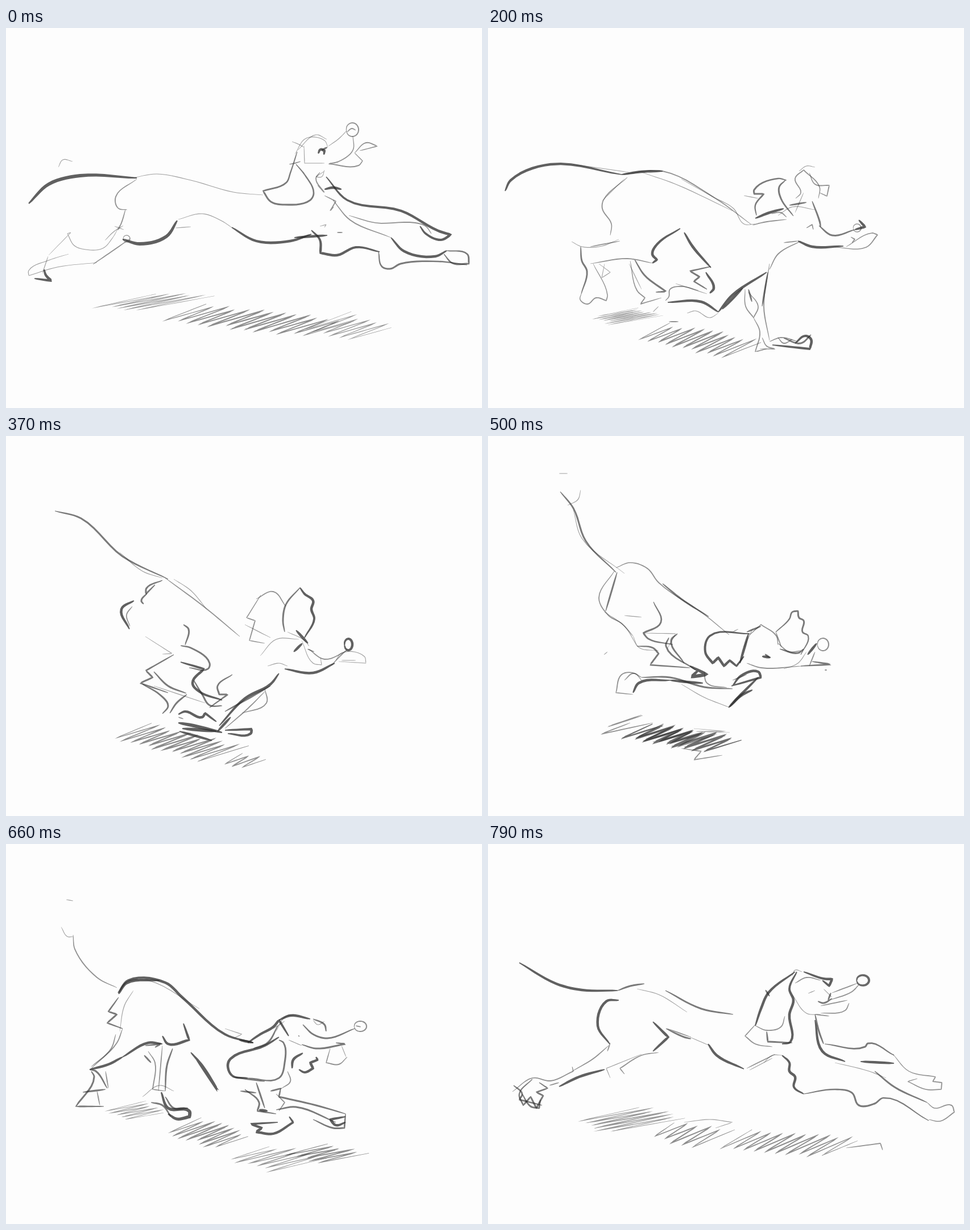
These frames come from a looping animation (837x669 px, 830 ms). An HTML page:

```html
<!DOCTYPE html>
<html lang="en">
<head>
<meta charset="utf-8">
<title>Running dog sketch</title>
<style>
html, body { margin: 0; width: 100%; height: 100%; overflow: hidden; background: #fdfdfd; }
svg { display: block; width: 100vw; height: 100vh; }
</style>
</head>
<body>
<svg id="stage" viewBox="0 0 837 669" fill="#2a2a2a"></svg>
<script>
const LOOP = 830, STEPS = 7;
const lerp = (a, b, k) => a + (b - a) * k;
const mix = (p, q, k) => p.map((v, i) => lerp(v, q[i], k));
const sub = (p, q) => [p[0] - q[0], p[1] - q[1]];
const unit = v => { const l = Math.hypot(...v) || 1; return [v[0] / l, v[1] / l]; };

let seed = 7;
const random = () => (seed = seed * 16807 % 2147483647) / 2147483647;

// Smooth curve through the points; sharp turns stay corners.
function curve(pts) {
  const heading = (i, own) => {
    if (!i || i === pts.length - 1) return own;
    const a = unit(sub(pts[i], pts[i - 1])), b = unit(sub(pts[i + 1], pts[i]));
    return a[0] * b[0] + a[1] * b[1] < .2 ? own : unit([a[0] + b[0], a[1] + b[1]]);
  };
  const out = [pts[0]];
  for (let i = 0; i < pts.length - 1; i++) {
    const p = pts[i], q = pts[i + 1], d = sub(q, p), len = Math.hypot(...d);
    const m = heading(i, unit(d)), n = heading(i + 1, unit(d));
    for (let s = 1; s <= STEPS; s++) {
      const t = s / STEPS, h = t * t * (3 - 2 * t);
      const u = t * (1 - t) * (1 - t) * len, v = t * t * (t - 1) * len;
      out.push([0, 1].map(c => lerp(p[c], q[c], h) + m[c] * u + n[c] * v));
    }
  }
  return out;
}

const poses = [];
let pose, strokes;
const startPose = at => poses.push(pose = { at });
const part = name => { strokes = pose[name] = []; };
const add = (w, pts) => strokes.push({ w, pts: curve(pts) });
const pen = w => (...lines) => lines.forEach(s =>
  add(w, s.split(" ").map(p => p.split(",").map(Number))));
const hair = pen(1.2), thin = pen(1.9), mid = pen(3.1), bold = pen(4.6), brush = pen(6);

function oval(w, x, y, rx, ry) {
  add(w, Array.from({ length: 10 }, (_, i) =>
    [x + rx * Math.cos(i * .7 + 3), y + ry * Math.sin(i * .7 + 3)]));
}

// Zigzag shading along a line; (dx, dy) is half a pen swing.
function hatch(w, x, y, x2, y2, dx, dy, n) {
  add(w, Array.from({ length: 2 * n + 1 }, (_, i) => {
    const k = i / (2 * n), r = (i % 2 ? -1 : 1) * (.75 + .4 * random());
    return [lerp(x, x2, k) + dx * r, lerp(y, y2, k) + dy * r];
  }));
}

startPose(0);
part("tail");
brush("40,309 75,275 130,260 230,264");
part("back");
hair("222,264 265,257 325,268 400,289 452,294");
part("body");
thin("230,266 193,297 197,317 213,320", "210,320 203,343 197,356", "552,254 545,265 560,290 548,277", "560,295 580,305 570,322 576,315");
brush("205,372 235,380 282,367 301,339");
hair("303,337 345,327 380,340 398,352", "298,352 325,350", "552,349 563,346 560,351", "92,245 100,232 117,235");
bold("397,351 440,375 500,375 537,363", "507,369 565,365");
oval(1.5, 212, 371, 6, 6);
thin("582,360 592,360");
part("hind");
hair("191,349 207,355", "200,347 187,370 170,388 140,390 120,383 108,362 114,360 75,400", "206,348 189,359 174,374", "160,413 90,421 40,436 40,427 75,409 110,398", "74,402 64,432");
thin("218,371 185,394 153,416");
bold("67,425 70,435 80,445 50,441");
part("fore");
bold("563,262 600,303 695,322 760,357 782,364 765,373 738,362 728,349", "677,369 700,393 755,402 775,392", "537,356 552,373 553,396 582,400 615,386 657,394", "560,284 575,281 590,284");
thin("603,330 650,343 720,343 738,349 748,362", "575,303 605,338 677,369");
mid("775,392 811,398 814,415 785,414 770,398", "811,417 760,411 694,415 675,424 661,420 655,394");
part("ear");
mid("512,218 500,255 493,272 452,287 466,306 490,311 535,303 541,290 525,258 510,240");
thin("498,240 508,238 518,235");
hair("560,252 545,262 555,262 560,250");
part("face");
hair("508,222 528,194 560,198 566,210", "513,215 545,188 564,196", "524,207 525,238 560,238", "503,200 513,204 524,210", "567,208 585,195 600,180");
oval(2, 609, 179, 11, 12);
thin("600,183 608,177 615,180", "610,190 610,215 585,235 567,239 620,242 627,234 613,220", "613,220 633,202 653,208 622,216");
bold("549,221 553,214 560,216 559,223");
mid("555,215 565,210");
part("shade");
hatch(1.3, 215, 478, 300, 485, 65, -13, 5);
hatch(2.1, 310, 500, 570, 530, 42, -14, 13);
hatch(1.4, 560, 515, 640, 540, 42, -14, 6);

startPose(120);
part("tail");
bold("53,338 62,297 130,263 235,252");
part("back");
thin("230,253 262,250 340,279 450,323 495,335");
part("body");
hair("275,256 397,283", "240,246 215,270 203,295", "345,355 370,395 390,418");
thin("232,258 202,300 195,325 179,350", "328,347 350,380 385,415 453,427", "500,410 520,372 545,361");
mid("257,377 264,380 272,362 300,346 325,345", "265,378 272,360 298,338", "325,345 380,390 400,405 440,425", "510,378 517,400 500,460");
part("hind");
thin("179,350 125,391 98,408 120,405", "85,427 68,432 67,447 78,455 115,450 120,435 112,425", "82,458 97,464 111,464", "170,403 165,415 182,445 203,432 187,405", "140,402 155,408 163,397 170,415", "195,388 192,405 203,399");
hair("186,333 145,368 120,390", "80,415 92,430 105,425", "177,400 198,393 230,385");
oval(1.3, 84, 411, 5, 4);
mid("120,418 140,395 200,374 257,378", "180,400 190,420 203,433 183,442");
bold("118,415 112,425 120,436");
part("fore");
thin("455,428 450,462 435,479", "478,505 490,530 508,553 528,553", "500,470 505,535 514,550", "508,553 507,575", "585,415 600,445 632,488 660,493", "583,460 620,480 668,530", "672,530 668,538 680,543 695,532");
bold("452,480 450,490 460,485 488,500", "663,494 703,509");
mid("512,575 549,566 530,558", "528,374 555,395 585,415", "530,457 555,454 583,460", "705,516 720,513 712,520 735,518 722,530 735,528 712,535");
hair("517,545 572,569", "540,390 580,448 525,450", "690,537 715,540");
part("ear");
thin("528,227 490,247 489,270 478,280 479,295 466,292 478,320 508,314", "550,290 552,255 565,241 579,255 576,275 572,300");
bold("528,227 550,265 540,295");
hair("460,290 490,305");
part("face");
hair("512,300 503,315 525,337", "508,316 535,295 570,310 578,340", "515,305 545,293 566,300", "500,340 520,320 540,310", "612,352 632,305 650,300 652,312 635,345", "615,372 632,362");
thin("549,335 556,322 560,336", "520,370 552,362");
bold("558,336 580,350 628,358", "600,378 622,370");
mid("545,350 560,362 600,375");
oval(4.5, 645, 358, 13, 8);
part("shade");
mid("270,476 183,479 250,480 168,495");
hatch(2, 235, 492, 440, 532, 38, -15, 7);
hatch(2.4, 525, 507, 665, 555, 29, -10, 9);

startPose(200);
part("tail");
bold("30,287 40,268 110,240 235,258");
part("back");
thin("235,258 307,252 400,300 463,346");
part("body");
bold("235,258 270,253 307,252", "338,353 298,380 289,398 297,408 289,414", "345,360 360,385 392,422", "405,500 430,470 490,430", "412,495 448,458");
hair("270,254 330,275 430,322", "340,266 395,297 432,318 450,345 470,345", "150,240 248,254", "240,265 200,305", "147,376 165,385 200,384 230,372");
thin("245,263 203,303 201,318 217,345 215,365", "232,375 180,385", "180,415 245,406 289,414", "495,425 510,398 550,375");
part("hind");
mid("163,385 165,410 174,428 164,468", "258,408 275,435 313,464 295,465", "392,420 355,428 372,438 362,446 385,460");
thin("164,468 162,478 175,486 190,475 208,480 210,470 185,415", "250,410 262,462 276,475 268,486 305,475", "370,462 340,455 320,460 318,473 312,480");
hair("195,415 215,430 200,440 205,415", "248,415 270,460", "330,450 385,468", "300,490 290,500", "350,502 365,498 390,510 405,502");
bold("383,430 397,458 390,467", "316,483 375,482 405,500");
thin("318,517 335,517");
part("fore");
thin("495,415 485,490 495,550", "452,460 453,490 467,510 475,490 458,465", "467,510 478,535 470,570 490,565", "482,545 490,560 505,565 478,565", "510,545 520,555 535,548", "495,552 515,545 545,552");
mid("492,430 482,490", "458,460 464,482", "520,546 550,555 568,540");
bold("500,558 566,565 568,548 558,542 540,555");
part("ear");
mid("523,268 512,280 515,300 537,331", "525,268 510,265 468,285 468,292 485,292 470,312 472,330");
thin("541,300 550,290 540,265 555,250 583,280 581,300", "565,255 575,275 600,277 596,296 583,290");
hair("450,295 475,300", "547,252 560,243 575,245");
part("face");
bold("470,335 495,325 520,318", "545,375 570,385 625,384");
thin("525,333 515,325 498,327", "560,352 570,346 572,355", "465,347 485,342 525,337", "520,378 545,375", "610,386 665,386 685,364 675,361 630,385", "638,368 645,372 640,378");
mid("530,312 560,307", "570,305 583,340 585,350", "582,348 605,365 645,355");
hair("510,330 535,315 575,320", "555,290 540,325");
bold("652,338 663,350 645,355");
oval(1.7, 649, 352, 7, 7);
part("shade");
hatch(1.1, 225, 500, 260, 515, 43, -8, 7);
hatch(2.1, 285, 535, 455, 565, 33, -15, 11);

startPose(370);
part("tail");
mid("86,132 132,145 205,212 285,252");
part("back");
thin("280,250 345,298 411,353");
part("body");
hair("295,252 325,272 353,305", "200,205 240,238 275,250", "245,353 292,383 275,384");
mid("275,254 247,268 246,278 262,262", "248,277 238,290 242,296", "312,332 321,340 315,368", "307,369 325,373 358,400 355,410 322,408");
bold("225,290 203,305 217,340");
thin("222,300 212,315 218,335");
part("hind");
mid("295,385 246,413 258,425 236,435 285,452", "260,415 285,440 317,453", "240,437 270,455 285,475 275,489", "318,455 300,470 288,488", "330,430 345,455 358,474 380,475");
bold("307,398 348,410 328,435 340,450 380,465", "303,490 315,485 345,495 350,488 370,503");
thin("303,495 312,498");
brush("303,505 330,510 380,522", "310,515 370,520");
hair("260,440 350,470");
part("fore");
bold("480,418 465,437 420,462 375,510", "395,495 372,520", "385,518 432,516 430,524 390,524");
mid("465,440 430,460 385,485", "398,420 372,440 375,455 390,455 358,478");
thin("455,445 458,470 415,488", "455,450 425,480 385,515");
part("ear");
thin("448,280 423,320 438,325 428,360 455,365", "440,287 470,274 492,300");
bold("517,267 525,278 540,290 537,305 542,322 525,355");
mid("517,267 492,297 487,325 490,345");
part("face");
hair("420,332 465,355", "447,387 475,358 515,358", "495,345 525,360 533,370", "520,360 540,400 555,403 553,390", "590,395 615,395", "460,405 480,400 495,405", "580,395 590,382 630,388 633,400 585,397");
bold("510,342 531,365", "506,380 521,365", "490,410 540,417 578,400");
thin("532,375 560,393 600,378", "572,404 590,385 600,376", "530,375 542,380");
oval(4.4, 602, 367, 7, 10);
part("shade");
hatch(2.2, 215, 520, 385, 560, 37, -13, 12);
hatch(1.9, 395, 568, 440, 577, 20, -9, 3);
bold("305,520 362,536");

startPose(500);
part("tail");
mid("127,98 150,127 172,185 225,240");
part("back");
thin("225,232 250,223 280,233 300,258 380,314 424,350");
part("body");
mid("307,260 340,287 388,318", "227,240 207,308", "291,292 304,328 273,347 282,357 325,367");
thin("222,238 195,285 212,316 235,330 255,352");
hair("240,316 270,319", "205,310 240,335 262,370", "273,347 330,348 315,375", "125,66 140,66", "140,122 158,112 163,95", "150,130 165,180 240,242", "204,385 210,380");
part("hind");
mid("262,370 290,373 300,383 285,403 355,408", "318,355 313,370 365,412", "333,348 322,360 345,400", "270,425 320,425 380,442 430,445");
brush("355,405 385,420 358,424 370,412");
hair("255,352 265,372 300,378", "340,437 380,460 425,478");
thin("270,430 258,418 235,420 225,452 255,455", "240,430 255,418 270,425");
bold("255,452 265,435 320,430");
part("fore");
bold("423,478 440,460 475,425", "430,440 445,422 475,415 480,425 428,440", "320,430 350,433 378,435", "425,477 445,457 465,447");
thin("380,415 385,435 420,443", "430,430 455,420");
part("ear");
bold("460,348 390,352 382,380 395,400 405,390 415,405 425,395 437,405 450,388");
mid("455,345 480,335", "506,345 530,322 535,310 545,308 547,320 555,325 553,345 563,352 550,385");
thin("506,345 516,372");
part("face");
thin("460,350 480,332 507,352 510,368", "455,400 480,408 553,405", "510,365 530,380 550,378", "565,405 575,380", "592,412 596,412");
bold("458,348 443,400", "482,388 497,390", "562,385 578,365");
mid("487,384 495,390", "513,375 545,382 555,375", "550,405 603,402 570,397");
oval(2.1, 589, 367, 10, 11);
hair("520,410 545,400 560,380", "440,340 430,345", "450,372 465,340");
part("shade");
thin("270,491 210,512 272,492", "250,505 198,525 290,505", "340,550 375,555 362,570 412,562");
hatch(3.8, 260, 518, 420, 545, 32, -12, 9);
hatch(2.5, 280, 518, 370, 538, 30, -12, 5);
hair("362,515 418,520 365,520 425,522");

startPose(660);
part("tail");
thin("118,160 121,185 160,235 195,253");
part("back");
bold("197,262 215,240 280,244 310,270 385,335 435,350");
part("body");
bold("198,264 212,245 270,240", "312,316 322,345 285,352 275,338", "275,352 250,350 205,375", "325,367 345,390 373,435 335,380");
hair("215,240 250,240 340,290", "224,258 208,285 200,330", "385,325 415,335 400,342", "106,98 118,100", "97,146 108,163 118,163");
mid("198,270 180,295 195,300 178,315 205,325", "245,355 272,352 262,358");
part("hind");
thin("205,325 195,350 150,395", "193,335 185,360 150,392", "160,435 165,460", "175,400 180,430", "250,365 262,385 258,432 280,435", "275,355 268,435");
bold("205,375 180,388 147,397");
mid("147,397 158,400 178,430", "150,400 155,410 123,462 172,462", "135,437 175,432", "243,372 255,385", "293,360 283,390 280,435", "255,455 275,460 290,480", "280,445 295,465 320,465");
brush("273,437 285,465 322,470 323,480 300,484 285,475");
hair("240,445 270,425 295,435");
part("fore");
mid("412,435 440,438", "420,432 445,455 442,470 475,475", "440,420 455,465", "483,430 480,445 545,460 597,475", "475,468 510,463 580,490", "540,485 575,500 595,500 597,475", "465,435 485,430");
thin("475,440 490,455 480,470");
bold("597,480 570,485 580,495 597,490", "478,490 430,493 450,500 440,507 470,510 505,490 498,480", "445,468 460,470");
part("ear");
bold("480,340 455,355 395,378 390,390 398,408 425,412", "425,350 447,335 470,322 480,310 497,338", "410,345 435,350");
mid("425,412 480,412 490,385 488,350 480,345", "435,360 460,350 478,320", "398,410 455,418");
part("face");
bold("480,310 500,302 535,308", "503,395 505,380 522,368", "545,375 548,380 535,385 540,395 525,402 515,397");
hair("475,330 490,305 510,300", "540,310 548,318 560,312", "470,325 490,312", "590,355 598,375", "497,345 520,355");
mid("540,308 560,318 563,330", "522,318 540,335 565,342 613,325", "520,353 545,360 597,352 580,350");
oval(2.1, 623, 321, 11, 9);
thin("615,320 624,322", "570,360 563,385 585,388 600,375", "495,400 500,418 485,430", "514,337 516,339");
part("shade");
hatch(1.3, 210, 460, 245, 480, 38, -8, 5);
hatch(2, 310, 495, 400, 525, 33, -13, 8);
hatch(1.5, 425, 543, 520, 565, 48, -13, 6);
hatch(2, 525, 537, 600, 553, 40, -9, 5);

startPose(790);
part("tail");
bold("55,209 120,246 165,257 228,258");
part("back");
mid("312,258 375,290 431,300");
part("body");
mid("228,258 250,250 275,246", "313,325 345,340 357,343");
hair("262,255 300,265 350,296", "270,370 208,395 215,412", "355,340 390,355", "460,398 500,377");
bold("230,275 208,277 193,320 214,352", "290,313 317,340 290,365", "387,352 402,372 450,396");
thin("215,350 210,365", "315,325 357,340", "300,367 270,372 232,395 240,405", "455,395 505,370");
part("hind");
thin("212,355 185,378 148,400", "148,392 150,400 110,417 78,412 43,436", "108,425 125,420");
bold("125,427 160,410 205,397");
mid("78,414 55,440 62,460 75,445 85,465 97,443 85,437 105,430 90,420", "45,425 60,440 55,450 95,460", "60,440 75,462 90,465 92,450");
part("fore");
mid("575,300 582,330 590,352", "592,352 663,357 668,351 714,372", "680,400 715,428 772,455", "555,440 610,432 640,438 652,460 680,457 695,447 775,487");
bold("575,310 588,365 628,383", "655,383 714,386", "517,372 530,385 530,400 540,410 538,428 555,440");
thin("712,370 740,400 787,410 782,418 798,420 797,432 770,432 738,418 755,413", "772,455 785,465 815,460 820,472 795,488 775,485");
hair("610,385 670,400 700,412", "485,385 500,372 517,372");
part("ear");
bold("540,225 493,262 480,290 470,320", "543,225 530,255 537,275 530,300 532,348 517,352");
thin("470,320 490,328 515,322 522,303", "470,318 452,338 470,352 500,357");
mid("490,330 492,348 535,350", "488,257 495,268");
part("face");
hair("535,232 540,222 552,225", "535,265 560,298 585,300", "563,263 575,258", "590,255 605,270");
bold("555,225 590,237 605,238 600,250 588,240");
thin("540,245 560,235 585,240", "605,262 650,245", "600,275 640,260 652,248", "585,285 632,275", "585,298 628,293 635,280", "575,300 600,303");
oval(4, 659, 240, 11, 9);
mid("580,277 590,280 605,272", "603,262 598,275");
part("shade");
hatch(1.6, 210, 475, 285, 495, 70, -14, 6);
hatch(2, 305, 502, 400, 520, 30, -15, 5);
hatch(2, 430, 520, 625, 535, 32, -16, 10);
hair("345,490 390,485 430,490 400,500");
thin("630,535 690,527 694,539");

function boxOf(lines) {
  const all = lines.flatMap(s => s.pts);
  const xs = all.map(p => p[0]), ys = all.map(p => p[1]);
  return [Math.min(...xs), Math.min(...ys), Math.max(...xs), Math.max(...ys)];
}

function pointAt(pts, u) {
  const f = u * (pts.length - 1), i = Math.min(Math.floor(f), pts.length - 2);
  return mix(pts[i], pts[i + 1], f - i);
}

// Single lines bend into each other; other parts move with their box.
function between(a, b, k) {
  if (a.length === 1 && b.length === 1) {
    const pts = Array.from({ length: 41 }, (_, i) =>
      mix(pointAt(a[0].pts, i / 40), pointAt(b[0].pts, i / 40), k));
    return [{ w: lerp(a[0].w, b[0].w, k), pts }];
  }
  const near = k < .5 ? a : b, from = boxOf(near), to = mix(boxOf(a), boxOf(b), k);
  const fit = (v, c) => lerp(to[c], to[c + 2], (v - from[c]) / (from[c + 2] - from[c]));
  return near.map(s => ({ w: s.w, pts: s.pts.map(p => p.map(fit)) }));
}

// Outline of a pen line that thins at both ends.
function ribbon({ w, pts }) {
  const left = [], right = [], last = pts.length - 1;
  pts.forEach((p, i) => {
    const d = unit(sub(pts[Math.min(i + 1, last)], pts[Math.max(i - 1, 0)]));
    const r = w / 2 * (.35 + .65 * Math.sqrt(Math.sin(Math.PI * i / last) + 1e-9));
    const side = k => (p[0] - d[1] * r * k).toFixed(1) + " " + (p[1] + d[0] * r * k).toFixed(1);
    left.push(side(1));
    right.unshift(side(-1));
  });
  return "M" + left.concat(right).join("L") + "Z";
}

const parts = ["shade", "tail", "back", "body", "hind", "fore", "ear", "face"];
function drawing(t) {
  let i = poses.length - 1;
  while (poses[i].at > t) i--;
  const a = poses[i], b = poses[i + 1] || a;
  const k = a === b ? 0 : (t - a.at) / (b.at - a.at);
  return parts.flatMap(name => k ? between(a[name], b[name], k) : a[name])
    .map(s => ({ d: ribbon(s), alpha: Math.min(.74, .34 + .09 * s.w) }));
}

const starts = [0, 40, 80, 120, 160, 200, 250, 290, 330, 370, 410, 460, 500, 540, 580, 620, 660, 700, 750, 790];
const sheets = starts.map(drawing);
const stage = document.getElementById("stage");
const pens = Array.from({ length: Math.max(...sheets.map(s => s.length)) }, () =>
  stage.appendChild(document.createElementNS("http://www.w3.org/2000/svg", "path")));

let shown = -1;
function show(ms) {
  const t = ms % LOOP;
  let i = starts.length - 1;
  while (starts[i] > t) i--;
  if (i === shown) return;
  shown = i;
  pens.forEach((p, n) => {
    const s = sheets[i][n];
    p.setAttribute("d", s ? s.d : "");
    if (s) p.setAttribute("fill-opacity", s.alpha.toFixed(2));
  });
}

const begin = performance.now();
function tick() {
  show(performance.now() - begin);
  requestAnimationFrame(tick);
}
tick();
</script>
</body>
</html>
```
